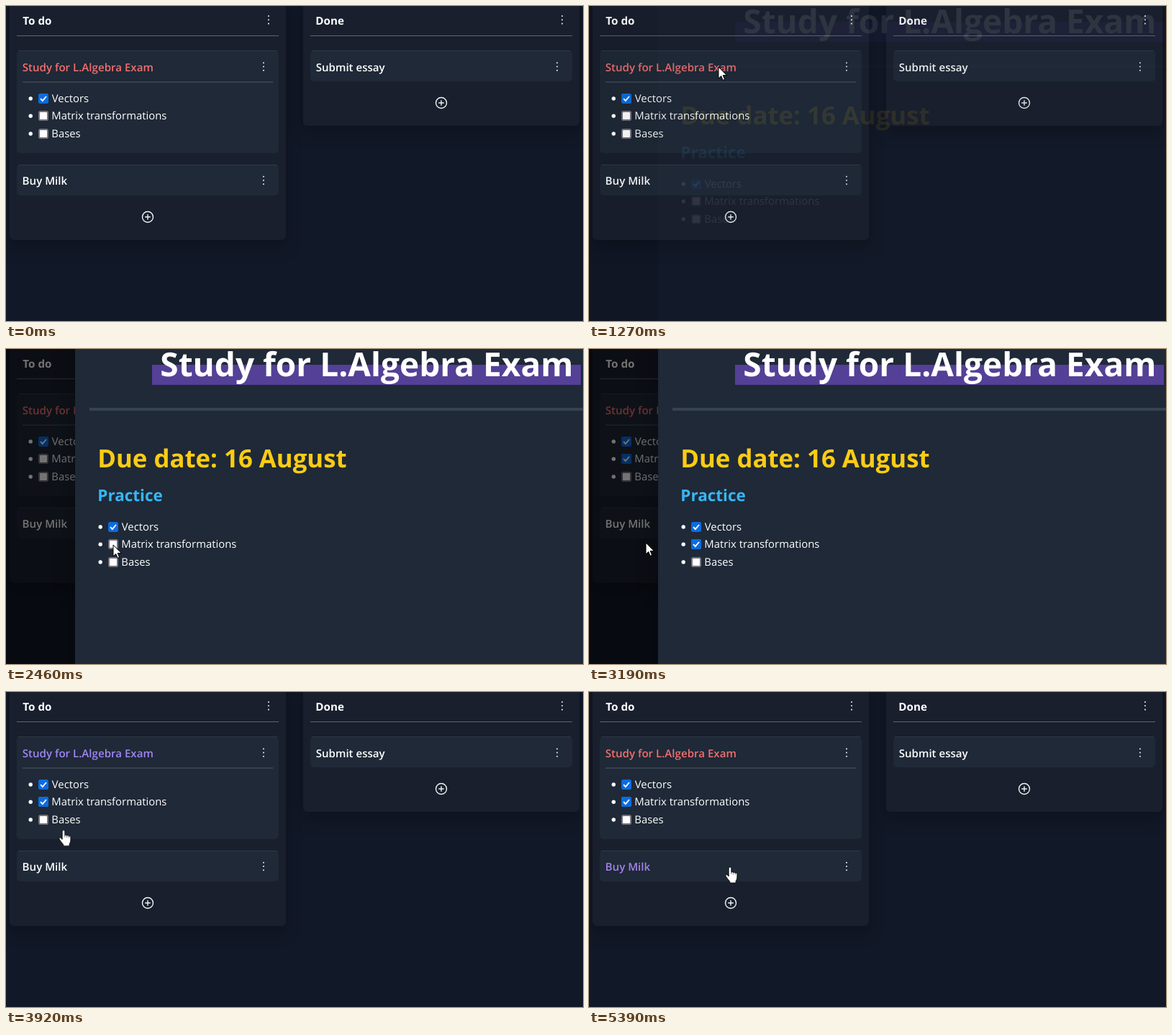
An HTML page for the animation above (5460 ms loop, 802x439 px).

```html
<!DOCTYPE html>
<html lang="en">
<head>
<meta charset="utf-8">
<title>Task board</title>
<style>
html, body { margin: 0; width: 100%; height: 100%; overflow: hidden; background: #111827; }
svg { display: block; width: 802px; height: 439px; font-family: "Open Sans", "Noto Sans", sans-serif; }
text { fill: #fff; font-size: 14.85px; text-rendering: geometricPrecision; }
.head { font-weight: 700; font-size: 15.2px; }
.name { font-weight: 600; font-size: 15.1px; }
.column { fill: #191f2d; filter: drop-shadow(0 10px 11px rgba(0, 0, 0, .22)); }
.card { fill: #1f2937; }
.edge { fill: none; stroke: #2f3a48; }
.rule { fill: #5f656f; }
.split { fill: #374151; }

.study, .buy, .tick, .modal, .cursor, .arrow, .hand { animation: 5460ms step-end infinite; }
.study { animation-name: study; }
.buy { animation-name: buy; }
.tick { animation-name: tick; }
.modal { animation-name: modal; }
.cursor { animation-name: move; }
.arrow { animation-name: arrow; }
.hand { animation-name: hand; }

/* hover colours */
@keyframes study {
  0%, 14.65%, 21.79%, 98.71%, 100% { fill: #f26e6e; }
  12.09%, 15.84%, 70.51% { fill: #a085f3; }
}
@keyframes buy {
  0%, 12.09%, 69.28% { fill: #fff; }
  10.87%, 65.57%, 98.71%, 100% { fill: #a582ec; }
  70.51% { fill: #fff; }
}
@keyframes tick {
  0% { opacity: 0; }
  47.44%, 100% { opacity: 1; }
}
@keyframes modal {
  0% { opacity: 0; }
  21.79% { opacity: .02; }
  23.25% { opacity: .1; }
  24.72% { opacity: 1; }
  59.5% { opacity: .3; }
  60.8%, 100% { opacity: 0; }
}
@keyframes arrow {
  0%, 10.87%, 15.84%, 65.57%, 70.51%, 100% { opacity: 0; }
  8.42%, 14.65%, 21.79%, 69.28% { opacity: 1; }
}
@keyframes hand {
  0%, 14.65%, 21.79%, 69.28% { opacity: 0; }
  10.87%, 15.84%, 65.57%, 70.51%, 100% { opacity: 1; }
}
/* pointer advances at 15 steps per second */
@keyframes move {
  0% { transform: translate(200px, 337px); }
  8.42% { transform: translate(200px, 337px); animation-timing-function: steps(3); }
  12.09% { transform: translate(199px, 180px); animation-timing-function: steps(2); }
  14.65% { transform: translate(187px, 57px); animation-timing-function: steps(2); }
  17.03% { transform: translate(180px, 85px); }
  29.18% { transform: translate(180px, 85px); animation-timing-function: steps(4); }
  34.07% { transform: translate(179px, 170px); animation-timing-function: steps(5); }
  40.11% { transform: translate(162px, 284px); animation-timing-function: steps(4); }
  45.04% { transform: translate(149px, 273px); }
  53.35% { transform: translate(149px, 273px); animation-timing-function: steps(3); }
  57.14% { transform: translate(79px, 270px); }
  64.34% { transform: translate(79px, 270px); animation-timing-function: steps(5); }
  70.51% { transform: translate(84px, 196px); animation-timing-function: steps(4); }
  75.46% { transform: translate(68px, 182px); animation-timing-function: steps(2); }
  78.02% { transform: translate(57px, 148px); animation-timing-function: steps(2); }
  80.4% { transform: translate(80px, 111px); animation-timing-function: steps(2); }
  82.77% { transform: translate(107px, 141px); animation-timing-function: steps(2); }
  85.35% { transform: translate(104px, 184px); animation-timing-function: steps(3); }
  89.01% { transform: translate(58px, 150px); animation-timing-function: steps(2); }
  91.58% { transform: translate(85px, 118px); animation-timing-function: steps(2); }
  93.96% { transform: translate(118px, 140px); animation-timing-function: steps(3); }
  97.62% { transform: translate(125px, 200px); animation-timing-function: steps(1); }
  98.71%, 100% { transform: translate(196px, 244px); }
}
</style>
</head>
<body>
<svg viewBox="0 0 802 439">
  <defs>
    <g id="dots" fill="#e5e7eb">
      <circle cy="-5.3" r="1.05"/><circle r="1.05"/><circle cy="5.3" r="1.05"/>
    </g>
    <g id="plus" fill="none" stroke="#f3f4f6" stroke-width="1.4">
      <circle r="7.5"/><path d="M-3.8 0h7.6M0-3.8v7.6"/>
    </g>
    <rect id="box" x="1" y="1" width="12" height="12" rx="1.8" fill="#fff" stroke="#77727c" stroke-width="2"/>
    <g id="checked">
      <rect width="14" height="14" rx="2.3" fill="#0b6ce0"/>
      <path d="M3 7.2l2.8 2.8L11 4" fill="none" stroke="#fff" stroke-width="1.9"/>
    </g>
    <g id="list">
      <g fill="#fff">
        <circle cx="34.2" cy="129" r="2.7"/><circle cx="34.2" cy="153.3" r="2.7"/><circle cx="34.2" cy="178" r="2.7"/>
      </g>
      <use href="#checked" x="45" y="122"/>
      <use href="#box" x="45" y="146"/>
      <use href="#box" x="45" y="171"/>
      <text x="63.8" y="134">Vectors</text>
      <text x="63.3" y="158">Matrix transformations</text>
      <text x="63.3" y="183">Bases</text>
    </g>
  </defs>

  <rect width="802" height="439" fill="#111827"/>

  <rect class="column" x="5" y="-20" width="384" height="346" rx="6"/>
  <text class="head" x="23.3" y="26">To do</text>
  <use href="#dots" x="365" y="19.3"/>
  <rect class="rule" x="15" y="41" width="364" height="1"/>

  <rect class="card" x="15" y="62" width="364" height="143" rx="5"/>
  <path class="edge" d="M17 62.5H377"/>
  <text class="name study" x="22.7" y="91">Study for L.Algebra Exam</text>
  <use href="#dots" x="358" y="84.5"/>
  <rect class="split" x="23" y="105" width="348" height="2"/>
  <use href="#list"/>
  <use class="tick" href="#checked" x="45" y="146"/>

  <rect class="card" x="15" y="221" width="364" height="43" rx="5"/>
  <path class="edge" d="M17 221.5H377"/>
  <text class="name buy" x="22.6" y="249">Buy Milk</text>
  <use href="#dots" x="358" y="243"/>
  <use href="#plus" x="197" y="294"/>

  <rect class="column" x="413" y="-20" width="384" height="187" rx="6"/>
  <text class="head" x="430.3" y="26">Done</text>
  <use href="#dots" x="773" y="19.3"/>
  <rect class="rule" x="423" y="41" width="364" height="1"/>
  <rect class="card" x="423" y="62" width="364" height="43" rx="5"/>
  <path class="edge" d="M425 62.5H785"/>
  <text class="name" x="430.7" y="91">Submit essay</text>
  <use href="#dots" x="766" y="84.5"/>
  <use href="#plus" x="605" y="135"/>

  <g class="modal">
    <rect width="802" height="439" fill="#000" fill-opacity=".55"/>
    <rect x="96" y="-60" width="760" height="560" fill="#1f2937" style="filter: drop-shadow(0 10px 18px rgba(0, 0, 0, .3))"/>
    <rect x="203" y="22" width="596" height="28" fill="#544097"/>
    <text x="214.3" y="38.2" style="font-size: 46px; font-weight: 700">Study for L.Algebra Exam</text>
    <rect x="116" y="82" width="686" height="4" fill="#364351"/>
    <text x="127.2" y="165" style="font-size: 34.8px; font-weight: 700; fill: #facc15">Due date: 16 August</text>
    <text x="127.3" y="212" style="font-size: 22.5px; font-weight: 700; fill: #38b6f5">Practice</text>
    <use href="#list" x="97" y="119"/>
    <use class="tick" href="#checked" x="142" y="265"/>
  </g>

  <g class="cursor" fill="#fff" stroke="#000" stroke-linejoin="round">
    <path class="arrow" d="M0 0V16l3.7-3.5 2.4 5.8 2.5-1-2.4-5.7h5.2z"/>
    <g class="hand" stroke-width=".8">
      <path d="M-1.8 1.8a1.8 1.8 0 0 1 3.6 0V7.2q1.4-1 2.8.4 1.5-.8 2.7.6 2-.5 2.6 1.5V14q0 3-1.8 5.5V22H-.2v-1.8Q-3.5 16.5-5.8 12.8q-.8-2 .8-2.4 1.4-.2 3.2 2.6z"/>
      <path d="M1.8 7.2v3M4.6 7.6v3M7.3 8.2v2.6" fill="none" stroke-width=".5"/>
    </g>
  </g>
</svg>
</body>
</html>
```
